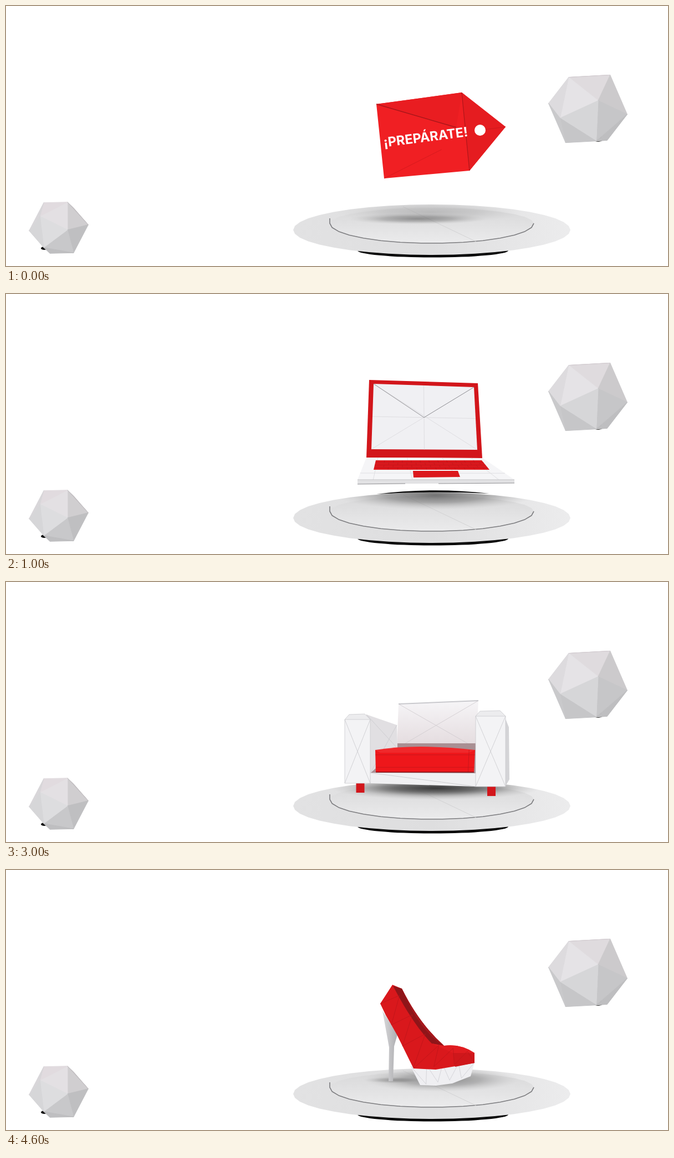
These frames come from a looping animation (1194 by 469 pixels, 5000 ms). An HTML page:

```html
<!DOCTYPE html>
<html lang="es">
<head>
<meta charset="utf-8">
<style>
html, body { margin: 0; width: 100%; height: 100%; overflow: hidden; background: #fff; }
svg { display: block; width: 100vw; height: 100vh; }
text { font: 700 23.6px Inter, Lato, sans-serif; fill: #fff; }
</style>
</head>
<body>
<svg id="stage" viewBox="0 0 1194 469">
  <defs>
    <radialGradient id="shade">
      <stop offset="0" stop-color="#333" stop-opacity=".9"/>
      <stop offset=".5" stop-color="#555" stop-opacity=".6"/>
      <stop offset="1" stop-color="#aaa" stop-opacity="0"/>
    </radialGradient>
    <linearGradient id="disc">
      <stop offset="0" stop-color="#e2e2e3"/>
      <stop offset=".5" stop-color="#dededf"/>
      <stop offset="1" stop-color="#ececed"/>
    </linearGradient>
    <linearGradient id="plate" x2="0" y2="1">
      <stop offset="0" stop-color="#d8d8d9"/>
      <stop offset="1" stop-color="#ebebec"/>
    </linearGradient>
    <linearGradient id="back" x2="0" y2="1">
      <stop offset="0" stop-color="#f6f5f7"/>
      <stop offset="1" stop-color="#e3dadd"/>
    </linearGradient>
    <linearGradient id="heel">
      <stop offset="0" stop-color="#d9d9db"/>
      <stop offset="1" stop-color="#adadb0"/>
    </linearGradient>
    <clipPath id="onDisc"><polygon id="rim"/></clipPath>
  </defs>
</svg>
<script>
const RED = '#ee171b', DEEP = '#d2161b', DARK = '#8f1519', LINE = '#c9c9cd';
const HOLD = 1000;
const stage = document.getElementById('stage');

function add(parent, tag, attrs = {}) {
  const el = document.createElementNS('http://www.w3.org/2000/svg', tag);
  for (const key in attrs) el.setAttribute(key, attrs[key]);
  return parent.appendChild(el);
}
const poly = (g, points, fill) => add(g, 'polygon', { points: points.join(' '), fill });
const path = (g, d, fill) => add(g, 'path', { d, fill });
const line = (g, d, stroke = LINE, width = .8) =>
  add(g, 'path', { d, stroke, fill: 'none', 'stroke-width': width, 'stroke-linejoin': 'round' });
const seg = (g, p, q, stroke, width) => line(g, `M${p}L${q}`, stroke, width);
const oval = (g, cx, cy, rx, ry, fill) => add(g, 'ellipse', { cx, cy, rx, ry, fill });
const shadow = (g, cx, cy, rx, ry, opacity) =>
  oval(add(g, 'g', { 'clip-path': 'url(#onDisc)', opacity }), cx, cy, rx, ry, 'url(#shade)');

// Points between two points, and inside a four-cornered face
const mix = (p, q, t) => p.map((v, i) => v + (q[i] - v) * t);
const at = ([a, b, c, d], u, v) => mix(mix(a, b, u), mix(d, c, u), v);
function cross(g, face, stroke) {
  seg(g, face[0], face[2], stroke);
  seg(g, face[1], face[3], stroke);
}

// Polygonal ellipse with separate upper and lower heights
const ring = (cx, cy, rx, up, down, sides) => Array.from({ length: sides }, (_, i) => {
  const a = i / sides * 2 * Math.PI, s = Math.sin(a);
  return [cx + rx * Math.cos(a), cy + (s < 0 ? up : down) * s];
});
const chamfer = (x, y, w, h, c) => [
  [x, y + c], [x + c, y], [x + w - c, y], [x + w, y + c],
  [x + w, y + h - c], [x + w - c, y + h], [x + c, y + h], [x, y + h - c]];

// Vectors
const dot = (a, b) => a.reduce((sum, v, i) => sum + v * b[i], 0);
const unit = a => a.map(v => v / Math.hypot(...a));
const vec = (a, b) => [
  a[1] * b[2] - a[2] * b[1], a[2] * b[0] - a[0] * b[2], a[0] * b[1] - a[1] * b[0]];

// Icosahedron turned so that one corner points along axis and a neighbour along hint
function gem(cx, cy, r, axis, hint) {
  const a = unit(axis), k = dot(a, hint);
  const p = unit(hint.map((v, i) => v - a[i] * k)), q = vec(a, p);
  const half = [a];
  for (let i = 0; i < 5; i++) {
    const t = i * 2 * Math.PI / 5;
    half.push(a.map((v, j) => (v + 2 * (Math.cos(t) * p[j] + Math.sin(t) * q[j])) / Math.sqrt(5)));
  }
  const corners = [...half, ...half.map(v => v.map(n => -n))];
  const near = (i, j) => dot(corners[i], corners[j]) > .4;
  const light = unit([-.4, -.45, .8]);
  for (let i = 0; i < 12; i++) for (let j = i + 1; j < 12; j++) for (let m = j + 1; m < 12; m++) {
    if (!near(i, j) || !near(j, m) || !near(i, m)) continue;
    const face = [corners[i], corners[j], corners[m]];
    const n = unit(face.reduce((s, v) => s.map((x, c) => x + v[c])));
    if (n[2] <= 0) continue;
    const tone = 190 + 38 * Math.max(0, dot(n, light)), pink = Math.max(0, -n[1]) * 4;
    const fill = `rgb(${tone + pink},${tone - pink / 2},${tone + 2})`;
    poly(stage, face.map(v => [cx + r * v[0], cy + r * v[1]]), fill)
      .setAttribute('stroke', fill);
  }
}

function drawBase() {
  oval(stage, 69, 437, 6, 3, '#111');
  gem(95, 400, 54.5, [.29, .07, .95], [.31, -.78, .54]);
  oval(stage, 1068, 240, 9, 5, '#333');
  gem(1049.5, 185.5, 74, [.25, -.2, .947], [-.507, -.811, .43]);

  oval(stage, 770, 441, 136, 12.5, '#080808');
  const rim = ring(768, 404, 250, 46, 45, 40);
  document.getElementById('rim').setAttribute('points', rim.join(' '));
  poly(stage, rim, 'url(#disc)');
  const plate = ring(768, 392, 184, 28, 36, 30);
  poly(stage, plate, 'url(#plate)');
  line(stage, 'M' + plate.slice(0, 16).join('L') + 'v-9', '#7c7c7f', 1.6);
  line(stage, 'M716 362L850 426', '#cdcdcf');
}

function tag(g) {
  shadow(g, 742, 384, 125, 10, .5);
  shadow(g, 765, 372, 170, 20, .22);
  const top = [668, 177], fold = [822, 156], tip = [901, 218], heel = [836, 297], low = [682, 311];
  const hole = [855, 224], mid = [812, 219];
  poly(g, [top, fold, tip, heel, low], '#f01f23');
  poly(g, [top, fold, mid], '#e91d21');
  poly(g, [fold, tip, heel], '#e51c20');
  seg(g, top, mid, '#a8161a', 1.4);
  seg(g, fold, heel, '#b3171b', 1.3);
  seg(g, hole, tip, '#c8181c');
  seg(g, low, mix(low, hole, .6), '#d0181c');
  oval(g, ...hole, 10, 10, '#fff');
  add(g, 'text', { transform: 'translate(682 254.5) rotate(-7.4)' }).textContent = '¡PREPÁRATE!';
}

function laptop(g) {
  path(g, 'M668 361Q770 348 872 360Q770 355 668 361', '#0b0b0b');
  shadow(g, 775, 363, 180, 26, .7);
  const lid = [[655, 155], [851, 161], [859, 296], [650, 295]];
  const glass = [[663, 162], [844, 168], [850, 281], [659, 280]];
  const deck = [[650, 295], [860, 296], [917, 335], [634, 335]];
  const keys = [[667, 300], [858, 300], [872, 317], [663, 317]];
  poly(g, lid, DEEP);
  poly(g, glass, '#f0f0f3');
  cross(g, glass, '#dad8dc');
  seg(g, at(glass, .5, 0), at(glass, .5, 1), '#dad8dc');
  seg(g, at(glass, 0, .5), at(glass, 1, .5), '#dad8dc');
  line(g, `M${glass[0]}L${at(glass, .5, .5)}L${glass[1]}`, '#929296', 1);
  poly(g, deck, '#f5f5f7');
  for (const u of [.1, .35, .65, .9]) seg(g, at(deck, u, 0), at(deck, u, 1), '#dadadd');
  seg(g, at(deck, 0, .7), at(deck, 1, .7), '#dadadd');
  poly(g, [deck[3], deck[2], [917, 341], [634, 343]], '#e2e2e4');
  line(g, 'M634 335H917', '#b9b9bc');
  line(g, 'M634 343L720 342M780 342L917 341', '#77777a');
  poly(g, keys, '#dc181d');
  for (let row = 0; row < 4; row++) {
    const v = row / 4;
    if (row) seg(g, at(keys, 0, v), at(keys, 1, v), '#b8161a', .7);
    for (let i = 1; i < 12; i++) {
      const u = (i + row % 2 / 2) / 12;
      seg(g, at(keys, u, v), at(keys, u, v + .25), '#b8161a', .6);
    }
  }
  poly(g, [[734, 319], [815, 319], [819, 330], [735, 331]], '#dc181d');
}

function wheel(g, x, y, r) {
  path(g, `M${x - r + 2} ${y}v-${r}h${2 * r}v${r}z`, '#b91519');
  oval(g, x, y, r, r, DEEP);
  oval(g, x - 1, y, r * .7, r * .7, '#dc181d');
}

function suitcase(g) {
  shadow(g, 775, 373, 165, 21, .6);
  shadow(g, 775, 368, 90, 12, .5);
  line(g, 'M747 196V173Q763 161 777 171V195', DEEP, 7);
  line(g, 'M744 171Q763 161 780 170', RED, 8);
  wheel(g, 737, 367, 8);
  wheel(g, 797, 369, 8);
  poly(g, chamfer(780, 194, 37.5, 166, 14), '#ececee');
  line(g, 'M796 196L811.5 211V344L800 359', RED, 3.4);
  line(g, 'M812 245L821 262V286L812 304', DEEP, 2.4);
  const shell = chamfer(696, 194, 113, 167, 15);
  poly(g, shell, '#f5f5f7');
  poly(g, [[785, 210], ...shell.slice(2, 6), [785, 345]], '#ebebee');
  poly(g, [shell[7], shell[4], shell[5], shell[6]], '#e2e2e5');
  for (let i = 0; i < 10; i++) {
    const x = 706 + i * 8.6;
    line(g, `M${x + 5} 196L${x} 213V345L${x + 3} 360`, i % 2 ? '#d6d6da' : '#c6c6ca');
  }
  for (let i = 0; i < 5; i++) {
    const row = line(g, `M697 ${213 + i * 33}H785L808 ${211 + i * 33}`, '#c6c6ca');
    if (i % 4) row.setAttribute('stroke-dasharray', '6 4');
  }
  line(g, 'M803 222L797 240V310L803 328M697 232L700 245V310L697 325');
  line(g, `M${shell[7]}L${shell[6]}L${shell[5]}L${shell[4]}`, '#a5a5a9');
  wheel(g, 721, 369, 9);
  wheel(g, 783, 372, 9.5);
}

function arm(g, left, right, top, bottom) {
  const front = [[left, top], [right, top], [right, bottom], [left, bottom]];
  poly(g, [front[0], [left + 8, top - 9], [right - 10, top - 10], front[1]], '#ececee');
  poly(g, front, '#f3f3f5');
  cross(g, front);
  line(g, `M${front.join('L')}ZL${left + 8} ${top - 9}L${right - 10} ${top - 10}L${right} ${top}`);
}

function armchair(g) {
  shadow(g, 775, 371, 190, 22, .9);
  shadow(g, 775, 372, 150, 14, .9);
  line(g, 'M639 362V380M875.5 367V386', DEEP, 15);
  const back = [[708, 220], [852, 214], [848, 300], [705, 300]];
  const inner = [[650, 239], [705, 258], [706, 300], [657, 345]];
  const base = [[656, 344], [847, 345], [847, 369], [656, 363]];
  poly(g, back, 'url(#back)');
  cross(g, back, '#cfc9cd');
  seg(g, back[0], back[1], LINE, 2);
  poly(g, [[706, 291], [848, 291], [847, 347], [658, 347], [660, 304], [706, 300]], '#a98f93');
  poly(g, inner, '#e1dfe2');
  cross(g, inner);
  poly(g, base, '#f0f0f2');
  seg(g, base[0], base[2], '#c4c4c8');
  const seat = [[666, 303], [846, 303], [844, 343], [667, 343]];
  poly(g, seat, RED);
  path(g, 'M666 303Q740 291 846 303L835 308H675Z', '#f0282b');
  for (const v of [.22, .78]) seg(g, at(seat, 0, v), at(seat, 1, v), '#c3161a');
  seg(g, at(seat, .94, 0), at(seat, .94, 1), '#c3161a');
  seg(g, seat[3], seat[2], '#841317', 1.6);
  arm(g, 611, 657, 248, 363);
  poly(g, [[899, 242], [907, 262], [908, 356], [901, 368]], '#d4d4d7');
  arm(g, 847, 901, 242, 369);
}

function shoe(g) {
  shadow(g, 785, 378, 140, 22, .55);
  shadow(g, 700, 379, 55, 6, .35);
  path(g, 'M679 254L706 297 700 318 698 381H690L691 320Z', 'url(#heel)');
  const sole = [[730, 354], [845, 347], [832, 374], [747, 388]];
  path(g, 'M730 354L775 359 845 347 838 372 805 385 775 389 747 388Z', '#efeff2');
  for (let i = 0; i < 4; i++) {
    seg(g, at(sole, i / 4, 0), at(sole, (i + .5) / 4, 1), '#cfcfd4');
    seg(g, at(sole, (i + .5) / 4, 1), at(sole, (i + 1) / 4, 0), '#cfcfd4');
  }
  path(g, 'M697 207L675 241 685 262 705 297 735 358 775 360 845 348V330Q820 313 790 317Q745 277 714 214Z', '#d9181c');
  path(g, 'M698 209L714 214Q745 277 790 317L768 313Q735 280 698 209Z', DARK);
  path(g, 'M714 214Q745 277 790 317Q745 290 714 214Z', '#a6181c');
  path(g, 'M768 313L790 317Q820 313 845 330H806Z', '#e01c20');
  path(g, 'M806 330H845V348L810 355Z', '#cf171b');
  // Facets zigzag between the underside and the opening
  const side = [[698, 209], [768, 313], [735, 356], [675, 241]];
  const toe = [[768, 313], [845, 330], [845, 348], [735, 358]];
  for (const face of [side, toe])
    for (let i = 0; i < 3; i++) {
      seg(g, at(face, i / 3, 1), at(face, (i + .5) / 3, 0), '#bb1519', .7);
      seg(g, at(face, (i + .5) / 3, 0), at(face, (i + 1) / 3, 1), '#bb1519', .7);
    }
}

drawBase();
const scenes = [tag, laptop, suitcase, armchair, shoe].map(draw => {
  const g = add(stage, 'g');
  draw(g);
  return g;
});

function render(ms) {
  const current = Math.floor(ms / HOLD) % scenes.length;
  scenes.forEach((g, i) => g.setAttribute('display', i === current ? 'inline' : 'none'));
}

const start = performance.now();
function tick() {
  render(performance.now() - start);
  requestAnimationFrame(tick);
}
tick();
</script>
</body>
</html>
```
